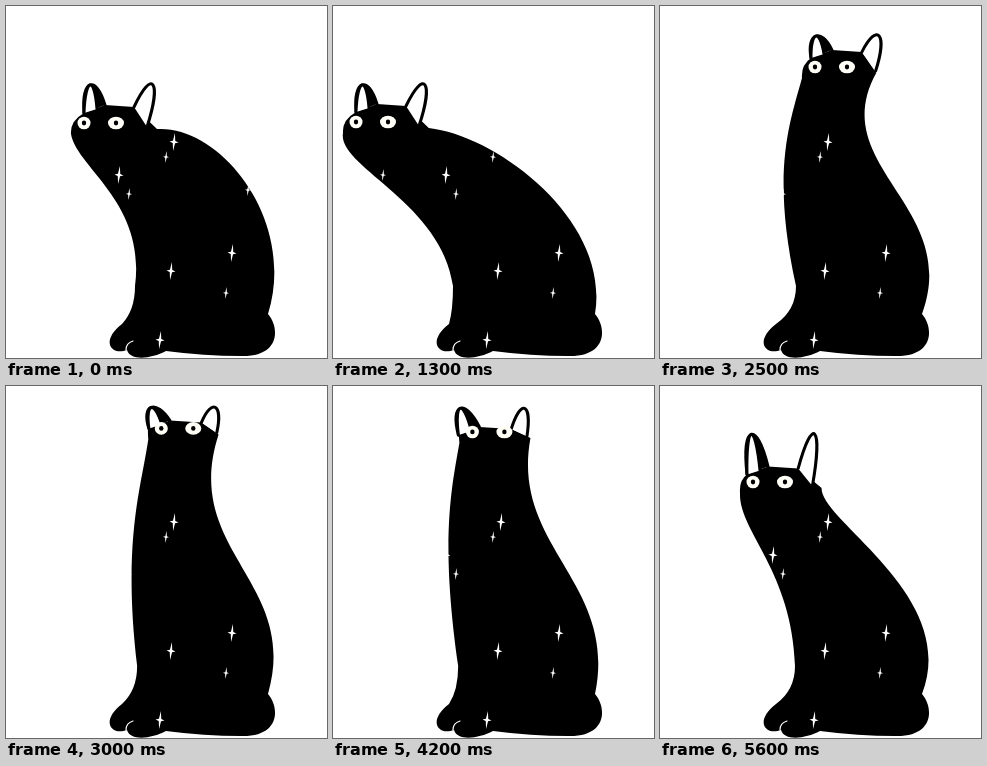
Animation of 321x352 px, one loop 5700 ms. Source, as an HTML page with a canvas:

```html
<!DOCTYPE html>
<html lang="en">
<head>
<meta charset="utf-8">
<title>Starry cat</title>
<style>
  html, body { margin: 0; width: 100%; height: 100%; overflow: hidden; background: #fff; }
  canvas { display: block; width: 321px; height: 352px; }
</style>
</head>
<body>
<canvas id="stage" width="321" height="352"></canvas>
<script>
const ctx = document.getElementById('stage').getContext('2d');
const LOOP = 5700, STEP = 100;

// Head x and y, ear height, head yaw, chest curve, body sway, shoulder x and y.
const sit = [94, 117, 28, 0, 11, 0, 215, 119];
const reach = [39, 116, 27, 0, -12, -9, 165, 130];
const rise = [76, 72, 24, -2, -5, 3, 110, 130];
const upright = [171, 61, 22, -4, -25, 7, 165, 160];
const gaze = [166, 41, 21, -14, -12, 1, 175, 165];
const tall = [152, 41, 28, -14, -19, -5, 178, 160];
const turn = [109, 96, 40, -6, -3, 6, 160, 135];

const mix = (a, b, k) => a.map((v, i) => v + (b[i] - v) * k);
const nudge = ([x, y, ...rest], dx, dy) => [x + dx, y + dy, ...rest];

const low = nudge(mix(sit, reach, .5), 0, 17);
const stretch = nudge(reach, 1, 6);
const skyward = nudge(gaze, 2, -2);
const settle = nudge(tall, 1, 6);

// A pose given twice in a row is a hold.
const keys = [
  [-900, settle], [-800, tall], [-200, mix(tall, turn, .5)], [-100, turn],
  [0, sit], [200, nudge(mix(sit, reach, .28), 0, 13)], [500, low],
  [600, low], [1100, stretch], [1200, stretch],
  [1300, reach], [1500, nudge(mix(reach, rise, .3), -11, -5)], [1800, rise],
  [2500, upright], [3200, skyward], [3700, skyward], [3800, gaze],
  [4400, settle], [4800, settle]
];

function slope(k, i) {
  const a = keys[k - 1], b = keys[k], c = keys[k + 1];
  if (!a || !c || a[1] === b[1] || b[1] === c[1]) return 0;
  return (c[1][i] - a[1][i]) / (c[0] - a[0]);
}

function poseAt(time) {
  const t = time >= 4800 ? time - LOOP : time;
  let k = 0;
  while (k < keys.length - 2 && t >= keys[k + 1][0]) k++;
  const [t0, a] = keys[k], [t1, b] = keys[k + 1];
  const d = t1 - t0, u = (t - t0) / d, u2 = u * u, u3 = u2 * u;
  return a.map((v, i) =>
    v * (2 * u3 - 3 * u2 + 1) + b[i] * (3 * u2 - 2 * u3) +
    d * (slope(k, i) * (u3 - 2 * u2 + u) + slope(k + 1, i) * (u3 - u2)));
}

const stars = [[168, 136], [160, 151], [113, 169], [123, 188], [226, 247],
  [220, 287], [165, 265], [50, 169], [154, 334], [242, 184]];

function star([x, y], n) {
  const size = n % 2 ? 6 : 9;
  ctx.beginPath();
  for (let i = 0; i < 8; i++) {
    const r = size * (i % 2 ? .18 : i % 4 ? .5 : 1);
    const a = i * Math.PI / 4 + .1;
    ctx.lineTo(x + r * Math.sin(a), y - r * Math.cos(a));
  }
  ctx.fill();
}

// A rounded leaf from a to b whose middle passes through tip.
function leaf(a, tip, b, color) {
  const control = (axis, side) =>
    tip[axis] + (tip[axis] - (a[axis] + b[axis]) / 2) / 3 + side * (b[axis] - a[axis]);
  ctx.fillStyle = color;
  ctx.beginPath();
  ctx.moveTo(...a);
  ctx.bezierCurveTo(control(0, -.35), control(1, -.35), control(0, .35), control(1, .35), ...b);
  ctx.fill();
  ctx.stroke();
}

function eye(x, y, rx) {
  for (const [w, h, color] of [[rx, 6.3, '#fffff8'], [2.2, 2.4, '#000']]) {
    ctx.fillStyle = color;
    ctx.beginPath();
    ctx.ellipse(x, y, w, h, 0, 0, Math.PI * 2);
    ctx.fill();
  }
}

function drawCat([x, y, ear, yaw, sag, sway, shoulderX, shoulderY]) {
  const at = (dx, dy) => [x + dx, y + dy];
  const lift = (117 - y) / 76;
  const base = yaw * yaw / 15 - 10;

  const left = [at(yaw - 16, base), at(1.3 * yaw - 10, base - ear), at(yaw - 3, base - 4)];
  const right = [at(.8 * yaw + 34, base - 6), at(1.2 * yaw + 53, base - ear), at(.6 * yaw + 47, 4)];
  const brow = at(yaw + 5, base - 8);
  const nape = at(57 - 16 * lift, 6);
  const cheek = at(-29, 11);
  const elbow = [129 + sway, 280];
  const chest = elbow[1] - cheek[1];

  ctx.fillStyle = ctx.strokeStyle = '#000';
  ctx.lineWidth = 3;
  ctx.lineJoin = ctx.lineCap = 'round';

  ctx.beginPath();
  // tail and feet
  ctx.moveTo(262, 308);
  ctx.bezierCurveTo(274, 322, 274, 351, 235, 350);
  ctx.quadraticCurveTo(198, 350, 160, 345);
  ctx.bezierCurveTo(145, 353, 124, 355, 121, 344);
  ctx.bezierCurveTo(105, 350, 94, 335, 116, 318);
  ctx.quadraticCurveTo(elbow[0], 304, ...elbow);
  // chest and head
  ctx.bezierCurveTo(elbow[0] + sag, elbow[1] - .55 * chest,
    cheek[0] + sag / 2, cheek[1] + .22 * chest, ...cheek);
  ctx.quadraticCurveTo(cheek[0] - 1, cheek[1] - 13, ...left[0]);
  ctx.lineTo(...brow);
  ctx.lineTo(...right[0]);
  ctx.lineTo(...nape);
  // back
  ctx.bezierCurveTo(shoulderX, shoulderY, 291 + 1.5 * sway, 215 - 20 * lift, 262, 308);
  ctx.fill();

  leaf(left[0], left[1], brow, '#000');
  leaf(...left, '#fff');
  leaf(...right, '#fff');
  eye(x - 16, y, 6.5);
  eye(x + 16, y, 8);
}

function draw(time) {
  ctx.fillStyle = '#fff';
  ctx.fillRect(0, 0, 321, 352);
  drawCat(poseAt(time));

  ctx.fillStyle = ctx.strokeStyle = '#fff';
  stars.forEach(star);
  ctx.lineWidth = 1.2;
  ctx.beginPath();
  ctx.moveTo(120, 344);
  ctx.quadraticCurveTo(120, 337, 127, 335);
  ctx.stroke();
}

const start = performance.now();
function tick() {
  const time = (performance.now() - start) % LOOP;
  draw(Math.floor(time / STEP) * STEP);
  requestAnimationFrame(tick);
}
tick();
</script>
</body>
</html>
```
